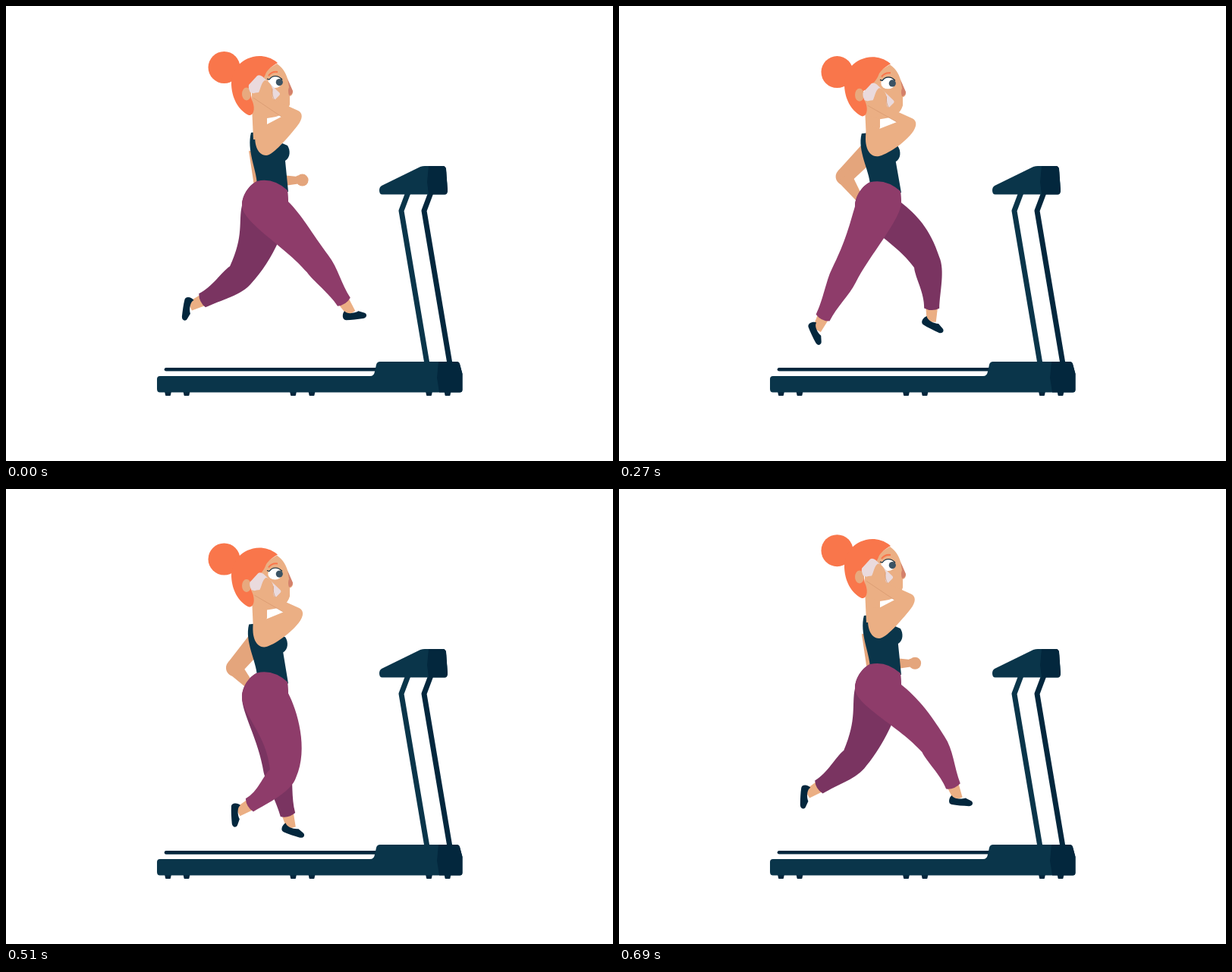
Write an HTML page with a canvas that moves like this. It is 800 px wide and 600 px high and loops after 0.72 s.

```html
<!DOCTYPE html>
<html lang="en">
<head>
<meta charset="utf-8">
<title>Treadmill run</title>
<style>
  html, body { margin: 0; width: 100%; height: 100%; overflow: hidden; background: #fff; }
  canvas { display: block; width: 100vw; height: 100vh; }
</style>
</head>
<body>
<canvas id="stage"></canvas>
<script>
const LOOP = 720, STEP = 30;
const C = {
  teal: '#0a354a', navy: '#03273d', skin: '#ebaf84', shade: '#e4a57c', hair: '#f9764b',
  near: '#8e3c6a', far: '#7a3461', phone: '#eadadd', line: '#d99a70'
};

const canvas = document.getElementById('stage');
const ctx = canvas.getContext('2d');
const dpr = window.devicePixelRatio || 1;
canvas.width = 800 * dpr;
canvas.height = 600 * dpr;

function fill(d, color) {
  ctx.fillStyle = color;
  ctx.fill(new Path2D(d));
}
function stroke(d, color, width) {
  ctx.strokeStyle = color;
  ctx.lineWidth = width;
  ctx.stroke(new Path2D(d));
}
function oval(x, y, rx, ry, color) {
  ctx.fillStyle = color;
  ctx.beginPath();
  ctx.ellipse(x, y, rx, ry, 0, 0, Math.PI * 2);
  ctx.fill();
}

const turn = t => 2 * Math.PI * t / LOOP;
const bump = (t, at, width) => Math.exp(-(((t % (LOOP / 2)) - at) ** 2) / (2 * width * width));
const mix = (a, b, u) => a + (b - a) * u;

// Mean plus harmonics given as [cos, sin] amplitudes
const wave = (mean, ...parts) => t => parts.reduce((sum, [c, s], i) => {
  const a = turn(t) * (i + 1);
  return sum + c * Math.cos(a) + s * Math.sin(a);
}, mean);

// Swing of each leg in degrees, forward from straight down
const NEAR = {
  color: C.near, length: 104,
  thigh: wave(14.4, [39.8, -11.2], [-5.5, -.3], [-7.3, .3], [0, 2]),
  shin: wave(-14.6, [36.3, 10.6], [11.2, -3.5], [1.7, 2.1], [0, 4])
};
const FAR = {
  color: C.far, length: 98,
  thigh: wave(7.4, [-27.6, 6.3], [-1.4, -6.5], [2.1, 1.5]),
  shin: wave(-18.5, [-47.2, -15.4], [4.8, 2.2], [4.7, 1.6], [0, -4])
};

const unit = (x, y) => { const l = Math.hypot(x, y) || 1; return [x / l, y / l]; };
const move = (p, d, k) => [p[0] + d[0] * k, p[1] + d[1] * k];
const left = d => [d[1], -d[0]];
const heading = deg => [Math.sin(deg * Math.PI / 180), Math.cos(deg * Math.PI / 180)];

function taper(a, b, ra, rb, color) {
  const n = left(unit(b[0] - a[0], b[1] - a[1]));
  fill(`M${move(a, n, ra)}L${move(b, n, rb)}L${move(b, n, -rb)}L${move(a, n, -ra)}Z`, color);
}

function shoe(p, deg) {
  ctx.save();
  ctx.translate(p[0], p[1]);
  ctx.rotate(deg * Math.PI / 180);
  ctx.scale(1.08, 1.08);
  fill('M-8,-2C-5,2 4,1 9,-2L16,0C20,1 20,6 15,7C8,8 0,9 -6,9C-11,9 -11,1 -8,-2Z', C.navy);
  ctx.restore();
}

function leg({ color, length, thigh, shin }, t) {
  const hipDeg = thigh(t), shinDeg = shin(t), bend = hipDeg - shinDeg;
  const up = heading(hipDeg), low = heading(shinDeg), tip = heading(shinDeg - bend * .22);
  const mid = unit(up[0] + low[0], up[1] + low[1]);
  const knee = move([342, 262], up, length), hem = move(knee, low, 61);
  const kf = move(knee, left(mid), 18), kb = move(knee, left(mid), -18);
  const hf = move(hem, left(tip), 10), hb = move(hem, left(tip), -10);
  const ankle = move(hem, tip, 17);
  const bulge = 7 * Math.max(0, heading(bend)[0]);
  const out = (p, d, k) => move(move(p, d, k), left(up), bulge);
  const hip = [372 + Math.max(0, up[0]) * 26, 258 + 24 * up[1]];
  taper(move(hem, tip, -3), move(ankle, tip, 1), 8, 6, C.skin);
  shoe(ankle, 40 - 1.15 * shinDeg);
  fill(`M331,231Q352,226 371,243L372,258
    C${out(hip, up, 0)} ${out(kf, mid, -38)} ${kf}
    C${move(kf, mid, 20)} ${move(hf, tip, -22)} ${hf}
    Q${move(hem, tip, 5)} ${hb}
    C${move(hb, tip, -20)} ${move(kb, low, 14)} ${kb}
    C${out(kb, up, -45)} ${311 + Math.min(0, up[0]) * 15},285 311,263
    C311,250 320,236 331,231Z`, color);
}

function farArm(twist) {
  const q = 1 / (1 + Math.exp(4 - 8 * twist));
  const shoulder = [333 - 4 * twist, 190];
  const elbow = [mix(338, 293, q), mix(231, 223, q)];
  const wrist = [mix(391, 314, q), mix(229, 260, q)];
  const d = unit(wrist[0] - elbow[0], wrist[1] - elbow[1]);
  taper(shoulder, elbow, 13, 11, C.shade);
  oval(...elbow, 11, 11, C.shade);
  taper(elbow, move(wrist, d, -3), 10.5, 4.5, C.shade);
  oval(wrist[0] + 1, wrist[1], 8, 8, C.shade);
  oval(wrist[0] - 4, wrist[1] - 2, 4, 4, C.shade);
}

function torso(s) {
  const x = v => v - 4 * s;
  fill(`M${x(323)},167L${x(332)},166L${x(332)},186L${x(345)},196L${x(364)},181L${x(371)},184
    C${x(375)},190 ${x(375)},200 ${x(368)},204L372,245L331,235
    C330,215 ${x(317)},190 ${x(323)},167Z`, C.teal);
}

function head(bun) {
  fill('M324,132L344,140V158L340,176H326Z', C.skin);
  fill(`M357,76C366,82 370,91 372,99L378,113Q378,118 374,119L374,130
    C371,141 362,146 344,148L324,142V108L338,88Z`, C.skin);
  fill('M371,96L378,112Q378,117 373,118Q371,112 373,107Z', '#d4816b');
  oval(287.5, 81 + bun, 21, 21, C.hair);
  fill(`M358,75C350,68 341,66 334,66C310,67 297,84 297,104C298,125 309,139 320,144
    C327,145 329,134 324,124L322,111C333,104 340,96 342,90C344,84 351,79 358,75Z`, C.hair);
  oval(317, 116, 6, 8.5, '#e8a97e');
  stroke('M346,92Q350,86 358,87', C.hair, 2);
  oval(354.5, 100.5, 9.2, 7.5, '#fff');
  oval(360.3, 100.6, 4.6, 4.6, '#3b5364');
  stroke('M344,96L347,97C351,91 359,91 364,97', C.navy, 1.2);
}

function phoneArm(s) {
  const a = (x, y) => `${x - 4 * s},${y}`;
  const b = (x, y) => `${x + 2 * s},${y + 11 * s}`;
  fill(`M${b(331, 92)}Q${b(334, 90)} ${b(338, 93)}L${b(360, 114)}Q${b(362, 116)} ${b(360, 118)}
    L${b(355, 123)}Q${b(353, 125)} ${b(350, 122)}L${b(322, 114)}Q${b(319, 108)} ${b(320, 104)}Z`, C.phone);
  const inner = `${363 + 4 * s},${146 + 7 * s}`;
  fill(`M${a(330, 160)}C${a(325, 180)} ${a(331, 197)} ${a(343, 197)}
    C${a(352, 197)} ${b(372, 173)} ${b(384, 158)}
    C${b(392, 148)} ${b(391, 141)} ${b(385, 138)}
    L${b(354, 124)}Q${b(350, 122)} ${b(351, 115)}C${b(353, 106)} ${b(346, 98)} ${b(341, 98)}
    C${b(336, 102)} ${b(336, 108)} ${b(333, 114)}Q${b(322, 114)} ${b(326, 121)}
    L${inner}L${344 - 2 * s},${156 + 6 * s}L${a(332, 156)}Z`, C.skin);
  stroke(`M${b(326, 121)}L${inner}M${b(351, 109)}Q${b(350, 118)} ${b(354, 124)}`, C.line, .8);
}

function treadmill(dip) {
  ctx.lineCap = 'round';
  stroke(`M211,${479.3 + dip}H489`, C.navy, 4.6);
  ctx.lineCap = 'butt';
  ctx.lineJoin = 'round';
  stroke('M560,246L551,270L585,472', C.navy, 7);
  stroke('M530,246L521,270L555,472', C.teal, 7);
  for (const x of [209, 374, 553])
    for (const f of [x, x + 24.5])
      fill(`M${f},508H${f + 9}L${f + 8},513Q${f + 8},514 ${f + 7},514H${f + 2}Q${f + 1},514 ${f + 1},513Z`, C.navy);
  fill(`M203,488H480Q485,488 486,482L488,473Q489,469 493,469H594Q597,469 598,472L601.5,485
    V506Q601.5,509.5 598,509.5H203Q199,509.5 199,505V492Q199,488 203,488Z`, C.teal);
  fill('M570,469H594Q597,469 598,472L601.5,485V506Q601.5,509.5 598,509.5H571L568,490Z', C.navy);
  fill(`M495,237L546,212Q549,211 552,211H576Q579,211 580,215L582,243Q582,248.5 578,248.5
    H496Q492,248.5 492,243Q492,239 495,237Z`, C.teal);
  fill('M557,211H576Q579,211 580,215L582,243Q582,248.5 578,248.5H557L555,232Z', C.navy);
}

function draw(time) {
  const t = Math.floor(time / STEP) * STEP % LOOP;
  const twist = (1 - Math.cos(turn(t - 15))) / 2;
  ctx.setTransform(canvas.width / 800, 0, 0, canvas.height / 600, 0, 0);
  ctx.fillStyle = '#fff';
  ctx.fillRect(0, 0, 800, 600);
  treadmill(2.5 * bump(t, 180, 12));
  ctx.translate(0, 15 * bump(t, 180, 41));
  farArm(twist);
  leg(FAR, t);
  torso(twist);
  leg(NEAR, t);
  head(5 * bump(t, 262, 25));
  phoneArm(twist);
}

const start = performance.now();
function tick() {
  draw(performance.now() - start);
  requestAnimationFrame(tick);
}
tick();
</script>
</body>
</html>
```
